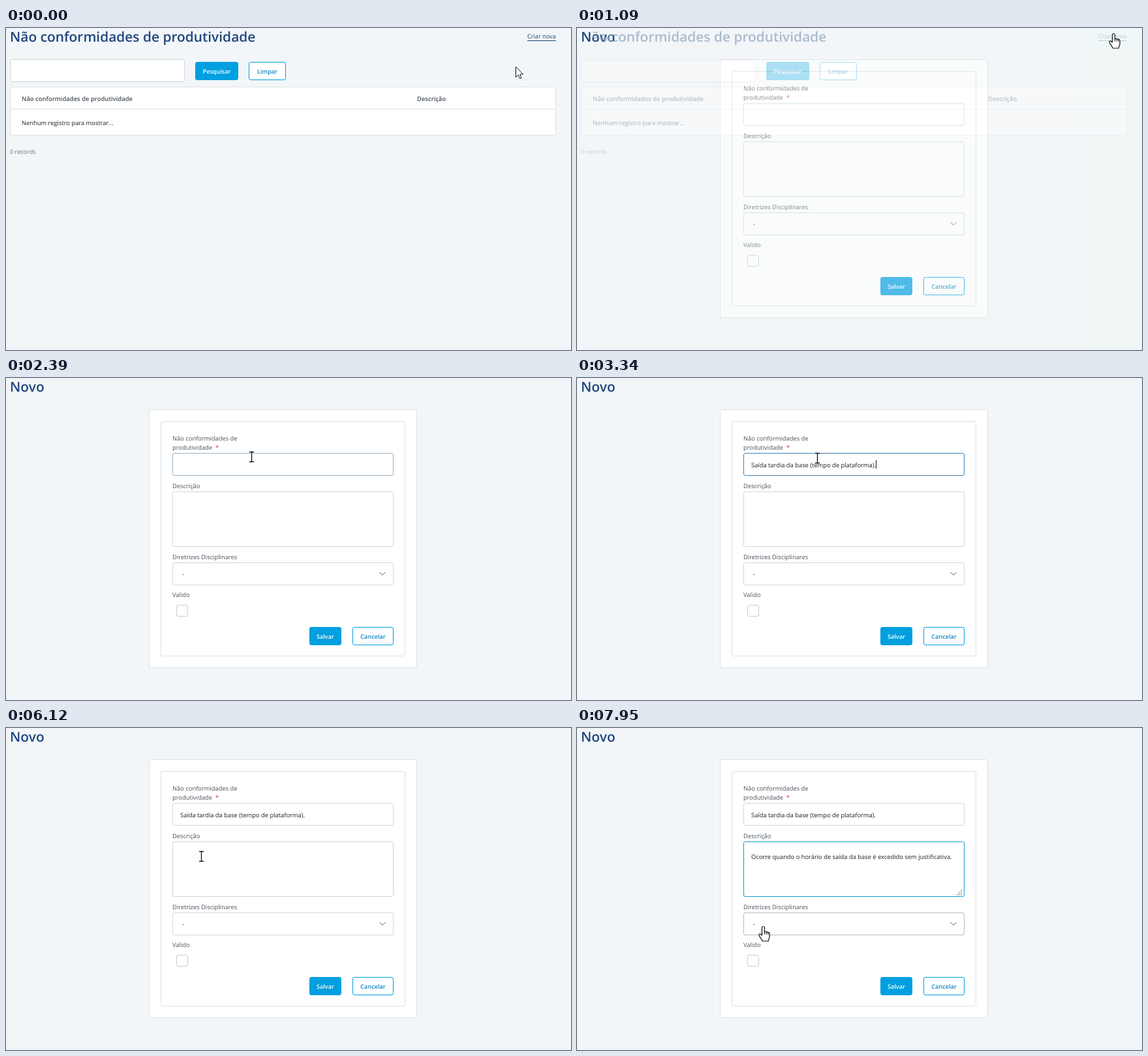
An HTML page that plays this animation: 866x494 px, repeating every 8 s.

```html
<!DOCTYPE html>
<html lang="pt">
<head>
<meta charset="utf-8">
<style>
html, body { margin: 0; width: 100%; height: 100%; overflow: hidden; background: #f2f6f8; }
svg { display: block; width: 866px; height: 494px; }
text { font: 9.35px 'Open Sans', 'Noto Sans', sans-serif; fill: #1d2126; white-space: pre; text-rendering: geometricPrecision; }
.title { font-size: 20.9px; font-weight: 600; fill: #20477f; }
.head { font-weight: 600; font-size: 9.45px; fill: #48525c; }
.label { fill: #49535d; }
.muted { fill: #726f7e; font-size: 9.15px; }
.link { font-size: 9.2px; fill: currentColor; }
.button { font-size: 9.1px; font-weight: 600; text-anchor: middle; }
</style>
</head>
<body>
<svg id="stage" viewBox="0 0 866 494"></svg>
<script>
const LOOP = 8000;
const BLUE = '#009fe0', LINE = '#dde1e5', FIELD = '#d3d7db', HOVER = '#b5bbc1';

const text = (x, y, content, cls = '', attrs = '') =>
  `<text x="${x}" y="${y}" class="${cls}" ${attrs}>${content}</text>`;
const box = (x, y, w, h, stroke = LINE, attrs = '') =>
  `<rect x="${x + .5}" y="${y + .5}" width="${w - 1}" height="${h - 1}" rx="2.5" fill="#fff" stroke="${stroke}" ${attrs}/>`;
const button = (x, y, w, label, solid) =>
  box(x, y, w, 28, BLUE, solid ? `style="fill:${BLUE}"` : '') +
  text(x + w / 2, y + 18, label, 'button', `style="fill:${solid ? '#fff' : '#0a86c2'}"`);
const caret = (id, x, y) =>
  `<path id="${id}" d="M${x} ${y}v13" stroke="#111"/>`;

const listPage = `<g id="list">
  ${text(6, 21, 'Não conformidades de produtividade', 'title')}
  <g id="link">${text(799, 16, 'Criar nova', 'link')}<path d="M799 19.5h44" stroke="currentColor"/></g>
  ${box(6, 48, 268, 35, '#cfd4d9')}
  ${button(290, 52, 66, 'Pesquisar', true)}
  ${button(372, 52, 57, 'Limpar')}
  ${box(6, 90, 837, 75)}
  <path d="M7 124.5h835" stroke="${LINE}"/>
  ${text(24, 112, 'Não conformidades de produtividade', 'head')}
  ${text(630, 112, 'Descrição', 'head')}
  ${text(24, 149, 'Nenhum registro para mostrar...')}
  ${text(6, 193, '0 records', 'muted')}
</g>`;

const formPage = `<g id="form">
  <path d="M0 0h866v494H0z" fill="#f2f6f8"/>
  ${text(6, 21, 'Novo', 'title')}
  ${box(219, 48, 411, 397)}
  ${box(237, 66, 375, 361)}
  ${text(255, 96, 'Não conformidades de', 'label')}
  ${text(255, 110, 'produtividade  <tspan fill="#e0333c">*</tspan>', 'label')}
  ${box(255, 115, 339, 35, FIELD, 'id="nameBox"')}
  ${text(267, 137, 'Saída tardia da base (tempo de plataforma).', '', 'id="nameText"')}
  ${text(255, 169, 'Descrição', 'label')}
  ${box(255, 174, 339, 85, FIELD, 'id="noteBox"')}
  ${text(267, 201, 'Ocorre quando o horário de saída da base é excedido sem justificativa.', '', 'id="noteText"')}
  <path id="grip" d="M588 249.5h2M585 252.5h2m1 0h2M582 255.5h2m1 0h2m1 0h2" stroke="#8b9096" stroke-width="1.6"/>
  ${text(255, 278, 'Diretrizes Disciplinares', 'label')}
  ${box(255, 283, 339, 35, FIELD, 'id="selectBox"')}
  ${text(270, 304, '-')}
  <path d="M572.5 298l4.5 4.5 4.5-4.5" fill="none" stroke="#555d65"/>
  ${text(255, 336, 'Valido', 'label')}
  ${box(261, 348, 18, 18, '#c9cdd2')}
  ${button(465, 382, 49, 'Salvar', true)}
  ${button(531, 382, 63, 'Cancelar')}
  ${caret('nameCaret', 458.5, 126)}
  ${caret('noteCaret', 267.5, 190)}
  ${caret('endCaret', 578.5, 190)}
</g>`;

const cursors = `<g id="cursor" stroke="#111" stroke-linejoin="round">
  <path id="arrow" fill="#fff" d="M.5.5V16.5L4.2 13 6.7 18.6 9 17.6 6.6 12H11.5z"/>
  <g id="hand"><path fill="#fff" stroke-width="1.2" d="M-2.5 13V1.5a2 2 0 0 1 4 0V8a1.6 1.6 0 0 1 2.8.4 1.5 1.5 0 0 1 2.6.6 1.4 1.4 0 0 1 2.2 1v5c0 3-1.8 4-1.8 7H-1.8c-.5-3-3.5-5-5-8.5-1-2.2 1-3.3 2.6-1.8z"/>
    <path fill="none" d="M1.5 7.5v4M4.3 8.4v3.4M6.9 9.2v3"/></g>
  <path id="beam" fill="none" stroke-width="1.3" d="M-3-7.5H4M.5-7.5v15M-3 7.5H4"/>
</g>`;

const stage = document.getElementById('stage');
stage.innerHTML = listPage + formPage + cursors;
const part = {};
stage.querySelectorAll('[id]').forEach(el => part[el.id] = el);

// Progress 0..1 in n equal jumps, the first at a and the last at b.
const steps = (t, a, b, n) =>
  t < a ? 0 : Math.min(n, Math.floor((t - a) / (b - a) * (n - 1) + 1.001)) / n;
const ease = p => p * p * (3 - 2 * p);
const between = (t, a, b) => t >= a && t < b;
const show = (el, on) => el.style.display = on ? '' : 'none';
const mix = (a, b, p) => '#' + [1, 3, 5].map(i => {
  const from = parseInt(a.slice(i, i + 2), 16), to = parseInt(b.slice(i, i + 2), 16);
  return Math.round(from + (to - from) * p).toString(16).padStart(2, '0');
}).join('');

// start, end, jumps, from x, y, to x, y, upward bow
const moves = [
  [80, 710, 9, 781, 59, 823, 9, 30],
  [1420, 1940, 8, 823, 9, 383, 119, 0],
  [2250, 2480, 4, 383, 119, 368, 123, 0],
  [6195, 6270, 2, 299, 197, 397, 199, 0],
  [6440, 6510, 2, 397, 199, 393, 208, 0],
  [7620, 7950, 5, 393, 208, 286, 305, 0]
];

function pointer(t) {
  const next = moves.findIndex(m => t < m[0]);
  const i = t >= 6120 && t < 6195 ? 3 : Math.max(0, (next < 0 ? moves.length : next) - 1);
  const [a, b, n, x0, y0, x1, y1, bow] = moves[i];
  const p = ease(steps(t, a, b, n));
  return [x0 + (x1 - x0) * p, y0 + (y1 - y0) * p - bow * Math.sin(Math.PI * p)].map(Math.round);
}

function pointerKind(t, x, y) {
  if (t < 1420) return x > 798 && between(y, 6, 20) ? 'hand' : 'arrow';
  if (!between(x, 255, 594)) return 'arrow';
  if (between(y, 115, 150) || between(y, 174, 259)) return 'beam';
  return between(y, 283, 318) ? 'hand' : 'arrow';
}

function draw(t) {
  const [x, y] = pointer(t), kind = pointerKind(t, x, y);
  show(part.cursor, !between(t, 3410, 6120) && !between(t, 7300, 7620));
  part.cursor.setAttribute('transform', `translate(${x} ${y})`);
  for (const k of ['arrow', 'hand', 'beam']) show(part[k], k === kind);

  const loaded = steps(t, 1010, 1160, 3);
  show(part.list, loaded < 1);
  part.form.style.opacity = loaded;
  part.link.style.color = kind === 'hand' ? '#2b86c4' : '#1d4479';

  const nameHover = mix(FIELD, '#c6cbd0', steps(t, 1940, 2100, 3));
  const nameFocus = mix(nameHover, '#447fae', steps(t, 2330, 2480, 3));
  part.nameBox.setAttribute('stroke', mix(nameFocus, FIELD, steps(t, 4420, 4580, 3)));
  const noteHover = mix(FIELD, '#c6cbd0', steps(t, 6120, 6270, 3));
  part.noteBox.setAttribute('stroke', mix(noteHover, '#149bd4', steps(t, 6680, 6920, 4)));
  part.selectBox.setAttribute('stroke', mix(FIELD, HOVER, t >= 7780 && kind === 'hand' ? 1 : 0));

  show(part.nameText, t >= 2790);
  show(part.nameCaret, between(t, 3340, 3890));
  show(part.noteText, t >= 7220);
  show(part.noteCaret, between(t, 6680, 7220));
  show(part.endCaret, between(t, 7220, 7620));
  show(part.grip, t >= 6680);
}

const start = performance.now();
function tick() {
  draw((performance.now() - start) % LOOP);
  requestAnimationFrame(tick);
}
tick();
</script>
</body>
</html>
```
